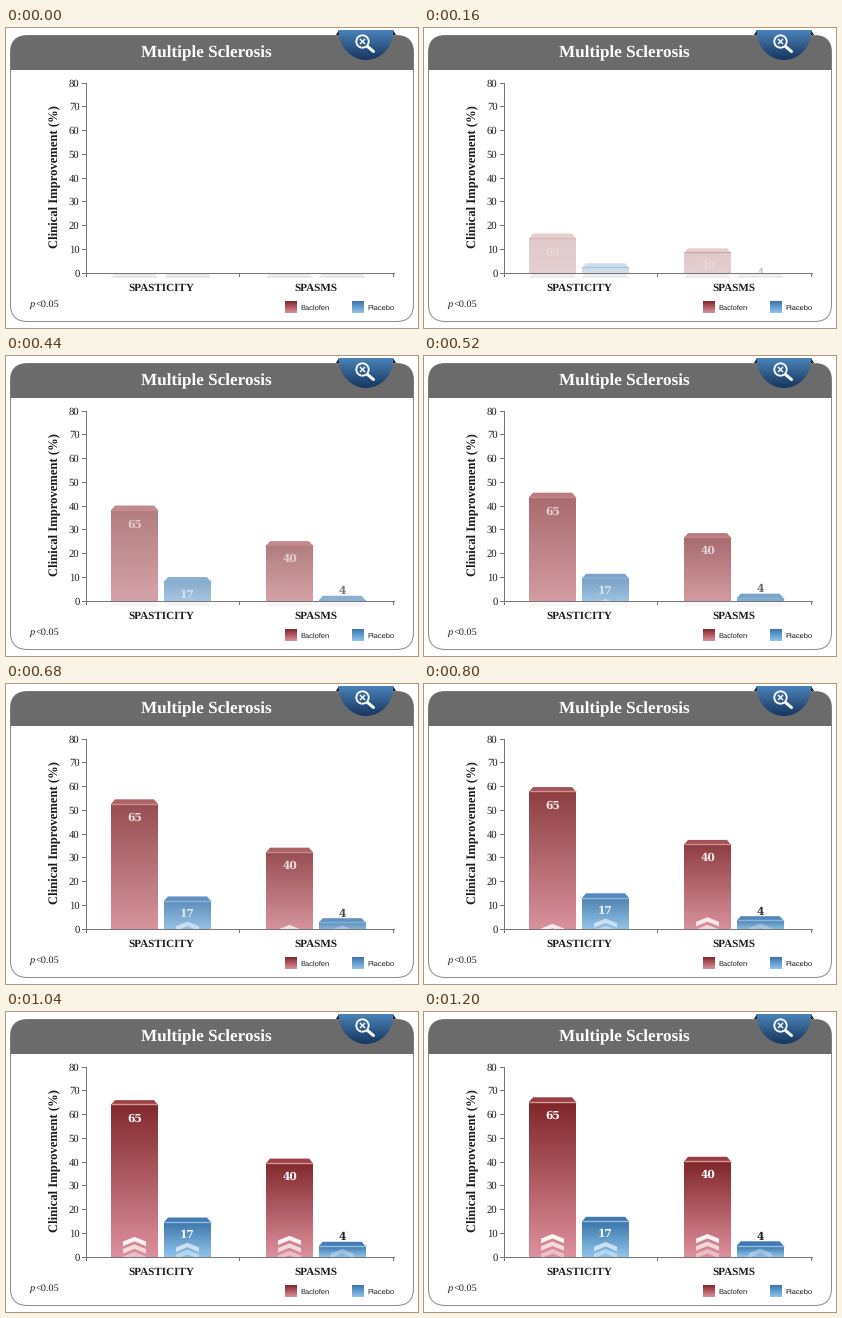
A matplotlib script for the animation above (8000 ms loop, 412x300 px).

```python
import numpy as np
import matplotlib.pyplot as plt
from matplotlib.animation import FuncAnimation
from matplotlib.colors import to_rgb
from matplotlib.patches import Circle, Ellipse, FancyBboxPatch, Polygon, Rectangle
from matplotlib.transforms import Affine2D

W, H, DPI = 412, 300, 100
PX = 72 / DPI            # points per pixel
FRAMES, STEP = 200, 40
RISE = 30                # frames the bars need to reach full height
FADE = 21                # frames the floor shadows need to vanish
BASE = 244.5             # y of the zero line
UNIT = 2.375             # pixels per percent
BAR_W = 47
SERIF, WIDE, SANS = "Liberation Serif", "DejaVu Serif", "Liberation Sans"
GREY, INK = "#6b6b6b", "#1c1c1c"

RED = dict(top="#80262a", bottom="#de8f9d", lid="#9a3d42", rim="#d39a9e")
BLUE = dict(top="#3a74aa", bottom="#8fc5ec", lid="#4079b2", rim="#94bfe2")

plt.rcParams["text.hinting"] = "none"
fig = plt.figure(figsize=(W / DPI, H / DPI), dpi=DPI, facecolor="white")
ax = fig.add_axes([0, 0, 1, 1])
ax.set_xlim(0, W)
ax.set_ylim(H, 0)
ax.axis("off")


def text(x, y, s, size, ha="center", color=INK, font=SERIF, **kw):
    kw.setdefault("va", "baseline")
    return ax.text(x, y, s, fontsize=size * PX, ha=ha, color=color,
                   family=font, **kw)


def line(xs, ys, color="#767676", width=1, z=5, **kw):
    return ax.plot(xs, ys, color=color, lw=width * PX, zorder=z, **kw)[0]


def gradient(x0, x1, y0, y1, top, bottom, z, **kw):
    mix = np.linspace(0, 1, 64)[:, None, None]
    rgb = (1 - mix) * np.array(to_rgb(top)) + mix * np.array(to_rgb(bottom))
    return ax.imshow(rgb, extent=(x0, x1, y1, y0), aspect="auto",
                     interpolation="bilinear", zorder=z, **kw)


def draw_card():
    box = dict(boxstyle="round,pad=0,rounding_size=17")
    card = FancyBboxPatch((4.5, 7.5), 403, 286, fc="white", ec="#8c8c8c",
                          lw=PX, zorder=0, **box)
    ax.add_patch(card)
    header = Rectangle((4, 7), 404, 35, fc=GREY, lw=0, zorder=1)
    ax.add_patch(header)
    header.set_clip_path(card)
    text(200.5, 29, "Multiple Sclerosis", 17.1, color="white", weight="bold")


def draw_badge():
    for side in (-1, 1):
        ax.add_patch(Polygon([(360 + side * 30, 7), (360 + side * 27, 2),
                              (360 + side * 24, 7)],
                             fc="#10151c", lw=0, zorder=2))
    shade = gradient(332, 388, 2, 32, "#4a82b8", "#17365e", 3)
    shade.set_clip_path(Ellipse((360, 2), 55, 60, transform=ax.transData))
    ax.add_patch(Circle((356.5, 13.5), 6.2, fc="none", ec="white",
                        lw=1.8 * PX, zorder=4))
    line([361.5, 367.5], [18.5, 23.5], "white", 3, solid_capstyle="round")
    for d in (-2, 2):
        line([354.5, 358.5], [13.5 - d, 13.5 + d], "white", 1.4)


def draw_axes():
    line([80.5, 80.5], [55, 248])
    line([76, 388], [BASE, BASE])
    for x in (233.5, 387.5):
        line([x, x], [BASE, 248])
    for value in range(0, 81, 10):
        y = BASE - value * UNIT
        line([76, 80.5], [y, y])
        text(73.5, y + 4, str(value), 10.6, ha="right")
    text(48.5, 148.5, "Clinical Improvement (%)", 12.6, weight="bold",
         rotation=90, va="center")
    text(155, 262.5, "SPASTICITY", 11.1, weight="bold")
    text(309.5, 262.5, "SPASMS", 11.1, weight="bold")


def draw_legend():
    text(24, 279, "p", 10.4, ha="left", style="italic")
    text(29.3, 279, "<0.05", 10.3, ha="left")
    for x, name, hue in ((279, "Baclofen", RED), (346, "Placebo", BLUE)):
        gradient(x, x + 12, 273, 285, hue["top"], hue["bottom"], 3)
        text(x + 15, 282, name, 7.5, ha="left", font=SANS)


class Bar:
    """A lidded column that slides up from behind the zero line."""

    def __init__(self, x, top, start, hue, label, label_dy, chevrons):
        self.drop = start - top
        self.shift = Affine2D()
        place = self.shift + ax.transData
        mask = Rectangle((0, 0), W, BASE + 0.5, transform=ax.transData)
        right, mid = x + BAR_W, x + BAR_W / 2

        self.parts = [
            (gradient(x, right, top, BASE + 0.5, hue["top"], hue["bottom"], 2,
                      transform=place), 1),
            (ax.add_patch(Polygon(
                [(x + 4, top - 4.7), (right - 4, top - 4.7),
                 (right, top), (x, top)],
                fc=hue["lid"], lw=0, zorder=2, transform=place)), 1),
            (line([x, right], [top - 0.5, top - 0.5], hue["rim"], 1.4, 3,
                  transform=place, solid_capstyle="butt"), 1),
        ]
        for tip, alpha in chevrons:
            self.parts.append((self.chevron(mid, tip, place), alpha))
        color = "white" if label_dy > 0 else INK
        number = text(mid, top + label_dy, label, 10.6, color=color,
                      font=WIDE, weight="bold", transform=place, zorder=4)
        self.parts.append((number, 1))
        for part, _ in self.parts:
            part.set_clip_on(True)
            part.set_clip_path(mask)

        self.shadow = ax.add_patch(Polygon(
            [(x + 3, 245.5), (right - 3, 245.5), (right, 250), (x, 250)],
            fc="#e8e8e8", lw=0, zorder=1))

    @staticmethod
    def chevron(mid, tip, place):
        points = [(mid - 11.5, tip + 4.7), (mid, tip), (mid + 11.5, tip + 4.7),
                  (mid + 11.5, tip + 9.2), (mid, tip + 4.5),
                  (mid - 11.5, tip + 9.2)]
        return ax.add_patch(Polygon(points, fc="white", lw=0, zorder=3,
                                    transform=place))

    def update(self, rise, shadow):
        self.shift.clear().translate(0, self.drop * (1 - rise))
        for part, alpha in self.parts:
            part.set_alpha(alpha * rise)
        self.shadow.set_alpha(shadow)


draw_card()
draw_badge()
draw_axes()
draw_legend()

TRIPLE = [(222, 0.92), (229.5, 0.7), (237, 0.45)]
bars = [
    Bar(105, 90, 250, RED, "65", 17.2, TRIPLE),
    Bar(158, 209.5, 250, BLUE, "17", 15.8, [(230, 0.65), (237, 0.42)]),
    Bar(260, 149.5, 250, RED, "40", 16.2, TRIPLE),
    Bar(312.7, 234, 260, BLUE, "4", -6, [(236.5, 0.35)]),
]


def update(n):
    rise = 1 - (1 - min(n / RISE, 1)) ** 2
    shadow = max(0, 1 - n / FADE)
    for bar in bars:
        bar.update(rise, shadow)


anim = FuncAnimation(fig, update, frames=FRAMES, interval=STEP,
                     init_func=lambda: update(0), repeat=True,
                     repeat_delay=0, blit=False)
plt.show()
```
